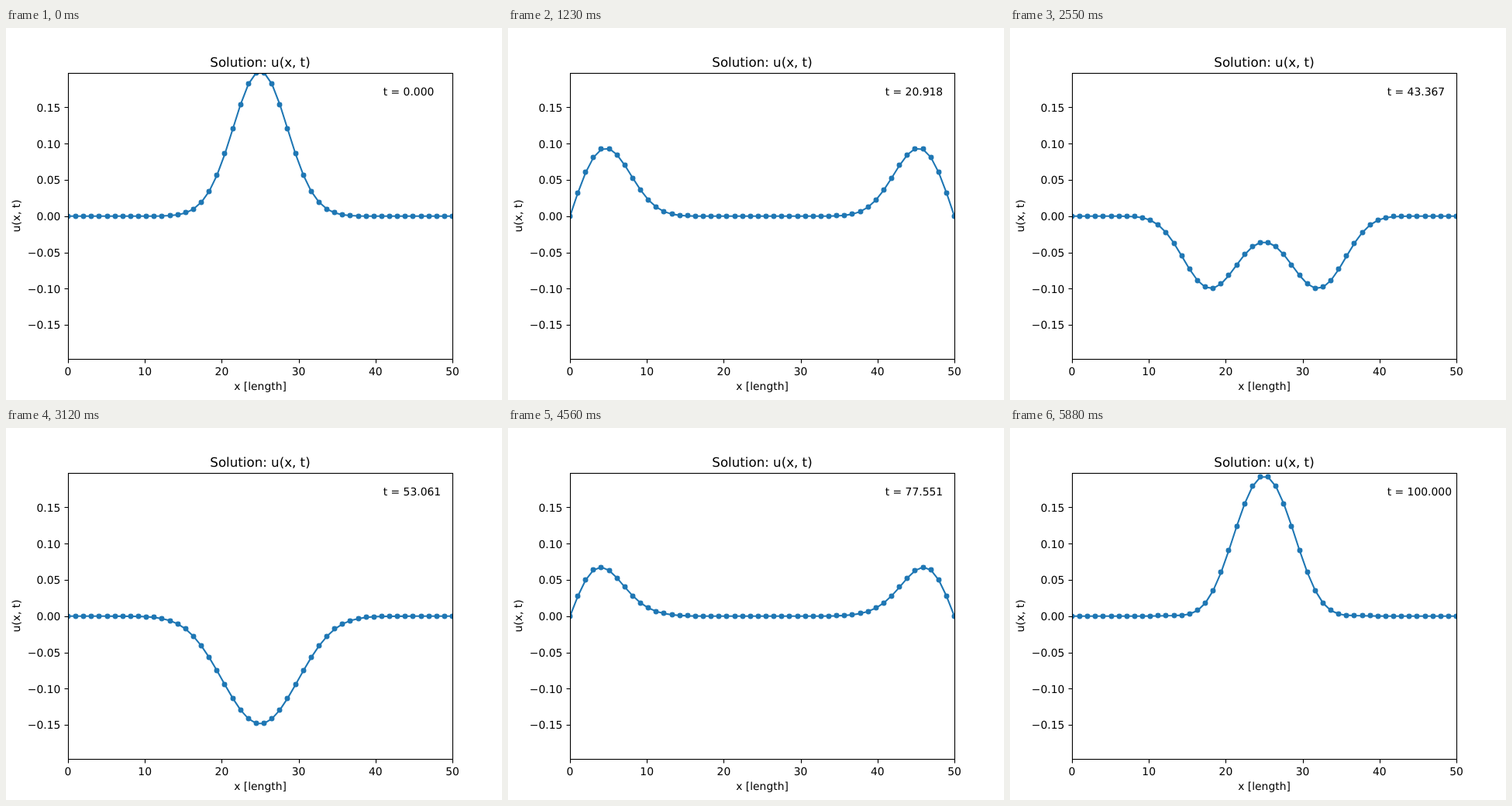
Recreate the animation shown at these times as an HTML page with a canvas. Size 640 by 480 pixels, loop 5.91 s.

```html
<!DOCTYPE html>
<html lang="en">
<head>
<meta charset="utf-8">
<title>Wave solution</title>
<style>
  html, body { margin: 0; width: 100%; height: 100%; overflow: hidden; background: #fff; }
  canvas { display: block; width: 640px; height: 480px; }
</style>
</head>
<body>
<canvas id="plot" width="640" height="480"></canvas>
<script>
const ctx = document.getElementById('plot').getContext('2d');

const PT = 100 / 72;             // pixels per point
const LEFT = 80, RIGHT = 576, TOP = 57.6, BOTTOM = 427.2;
const LENGTH = 50, POINTS = 50, STEPS = 196, END_TIME = 100, STEP_MS = 30;
const COURANT = 0.5;
const BLUE = '#1f77b4';

// Wave equation with fixed ends, explicit second-order scheme.
function solve() {
  const r = COURANT * COURANT;
  const first = Array.from({ length: POINTS }, (_, i) => {
    const d = (i * LENGTH / (POINTS - 1) - LENGTH / 2) / 5;
    return i % (POINTS - 1) ? 0.2 * Math.exp(-d * d) : 0;
  });
  const curve = (u, i) => i % (POINTS - 1) ? u[i + 1] - 2 * u[i] + u[i - 1] : 0;
  const rows = [first, first.map((v, i) => v + r / 2 * curve(first, i))];
  while (rows.length <= STEPS) {
    const now = rows[rows.length - 1], before = rows[rows.length - 2];
    rows.push(now.map((v, i) => i % (POINTS - 1) ? 2 * v - before[i] + r * curve(now, i) : 0));
  }
  return rows;
}

const rows = solve();
const uMax = Math.max(...rows.flat());
const uMin = Math.min(...rows.flat());

const px = x => LEFT + x / LENGTH * (RIGHT - LEFT);
const py = u => TOP + (uMax - u) / (uMax - uMin) * (BOTTOM - TOP);
const snap = v => Math.floor(v + 0.5);

function text(str, x, y, align = 'left', size = 10) {
  ctx.font = `${size * PT}px "DejaVu Sans", sans-serif`;
  ctx.textAlign = align;
  ctx.fillText(str, x, y);
}

function segment(x1, y1, x2, y2) {
  ctx.beginPath();
  ctx.moveTo(x1, y1);
  ctx.lineTo(x2, y2);
  ctx.stroke();
}

function drawCurve(row) {
  const xs = row.map((_, i) => px(i * LENGTH / (POINTS - 1)));
  const ys = row.map(py);
  ctx.save();
  ctx.beginPath();
  ctx.rect(80, 58, 496, 369);
  ctx.clip();
  ctx.strokeStyle = ctx.fillStyle = BLUE;
  ctx.lineWidth = 1.5 * PT;
  ctx.lineJoin = 'round';
  ctx.lineCap = 'square';
  ctx.beginPath();
  xs.forEach((x, i) => ctx.lineTo(x, ys[i]));
  ctx.stroke();
  // Markers sit on whole pixels.
  xs.forEach((x, i) => {
    ctx.beginPath();
    ctx.arc(snap(x), snap(ys[i]), 2.5 * PT, 0, 2 * Math.PI);
    ctx.fill();
  });
  ctx.restore();
}

function drawAxes() {
  ctx.strokeStyle = ctx.fillStyle = '#000';
  ctx.lineWidth = 0.8 * PT;
  ctx.lineCap = 'butt';
  for (let x = 0; x <= LENGTH; x += 10) {
    const at = snap(px(x)) + 0.5;
    segment(at, 427.5, at, 432.5);
    text(String(x), px(x), 448, 'center');
  }
  for (let k = -3; k <= 3; k++) {
    const y = py(k * 0.05), at = snap(y) + 0.5;
    segment(75.5, at, 80.5, at);
    const label = (k < 0 ? '\u2212' : '') + Math.abs(k * 0.05).toFixed(2);
    text(label, 70.3, Math.round(y + 5.3), 'right');
  }
  ctx.strokeRect(80.5, 58.5, 496, 369);

  text('Solution: u(x, t)', 328, 50, 'center', 12);
  text('x [length]', 328, 467, 'center');
  ctx.save();
  ctx.translate(18, 242.4);
  ctx.rotate(-Math.PI / 2);
  text('u(x, t)', 0, 0, 'center');
  ctx.restore();
}

function draw(step) {
  ctx.fillStyle = '#fff';
  ctx.fillRect(0, 0, 640, 480);
  drawCurve(rows[step]);
  drawAxes();
  text('t = ' + (step * END_TIME / STEPS).toFixed(3), 486.7, 87);
}

ctx.textRendering = 'geometricPrecision';
const start = performance.now();

function tick() {
  const elapsed = performance.now() - start;
  draw(Math.floor(elapsed / STEP_MS) % (STEPS + 1));
  requestAnimationFrame(tick);
}

tick();
</script>
</body>
</html>
```
